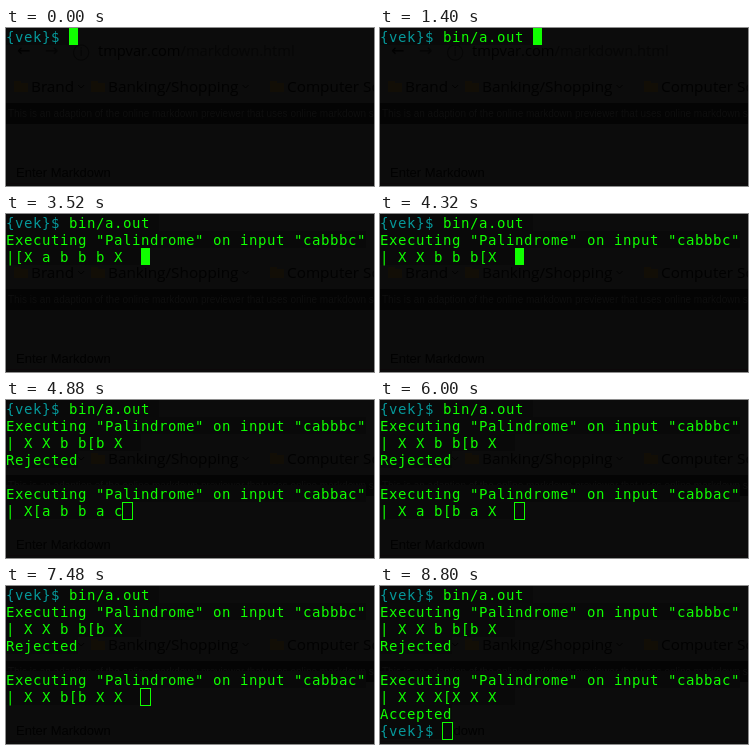
An HTML page with a canvas for the animation above (9440 ms loop, 368 by 158 pixels).

```html
<!DOCTYPE html>
<html lang="en">
<head>
<meta charset="utf-8">
<title>Palindrome machine</title>
<style>
  html, body { margin: 0; height: 100%; overflow: hidden; background: #0a0a0a; }
  canvas { display: block; }
</style>
</head>
<body>
<canvas id="stage" width="368" height="158"></canvas>
<script>
const ctx = document.getElementById('stage').getContext('2d');
const LOOP = 9440, CELL = 9, ROW = 17;
const PROMPT = '{vek}$ ';
const GREEN = '#10ff00', TEAL = '#06989a', SHADE = '#090909', INK = '#020202';

// Turing machine: cross out matching letters from both ends.
function simulate(word) {
  const tape = ['|', ...word], views = [];
  let head = 1;
  const isLetter = () => /[abc]/.test(tape[head]);
  const show = () => views.push(
    tape.map((c, i) => (i === 0 ? '' : i === head ? '[' : ' ') + c).join(''));
  const move = step => {
    head += step;
    tape[head] ??= '';
    show();
  };
  show();
  while (isLetter()) {
    const letter = tape[head];
    tape[head] = 'X';
    do move(1); while (isLetter());
    tape[head] ||= ' ';
    move(-1);
    if (tape[head] !== letter) return { views, verdict: 'Rejected' };
    tape[head] = 'X';
    do move(-1); while (isLetter());
    move(1);
  }
  return { views, verdict: 'Accepted' };
}

// Evenly spaced times, snapped to the 40 ms recording clock.
const spread = (from, to, count) => Array.from({ length: count }, (_, i) =>
  Math.round((from + (to - from) * i / (count - 1)) / 40) * 40);

const runs = [
  { word: 'cabbbc', times: [...spread(1720, 2680, 7), ...spread(2800, 3520, 6), 3720, ...spread(3880, 4480, 5)], end: 4600 },
  { word: 'cabbac', times: [4600, 4880, 4920, ...spread(5080, 6000, 7), 6120, ...spread(6280, 7320, 8), 7480, ...spread(7600, 8520, 7), 8680], end: 8800 },
];
const UNFOCUSED_AT = 4720;

const screens = [];
['', 'b', 'bi', 'bin/', 'bin/a', 'bin/a.out '].forEach((typed, i) =>
  screens.push({ time: i ? 800 + 120 * i : 0, lines: [PROMPT + typed] }));

let history = [PROMPT + 'bin/a.out '];
for (const { word, times, end } of runs) {
  const { views, verdict } = simulate(word);
  history = [...history, `Executing "Palindrome" on input "${word}"`];
  views.forEach((view, i) => screens.push({ time: times[i], lines: [...history, view] }));
  history = [...history, views.at(-1), verdict];
  if (end < 8000) history.push('');
}
screens.push({ time: runs[1].end, lines: [...history, PROMPT] });

function label(text, x, y, font, color) {
  ctx.font = font;
  ctx.fillStyle = color;
  ctx.fillText(text, x, y);
}

function box(x, y, w, h, color) {
  ctx.fillStyle = color;
  ctx.fillRect(x, y, w, h);
}

function chevron(x, y) {
  ctx.beginPath();
  ctx.moveTo(x, y);
  ctx.lineTo(x + 3, y + 3);
  ctx.lineTo(x + 6, y);
  ctx.strokeStyle = INK;
  ctx.stroke();
}

// Web page faintly visible through the terminal.
function drawPage() {
  const icons = '16px "DejaVu Sans", sans-serif';
  const address = '14.7px "Open Sans", sans-serif';
  const bookmark = '15.3px "Open Sans", sans-serif';
  box(0, 0, 368, 158, '#0c0c0c');
  label('←', 11, 28, icons, INK);
  label('→', 39, 28, icons, '#060606');
  label('ⓘ', 67, 28, icons, '#060606');
  label('tmpvar.com', 92, 28, address, INK);
  const hostWidth = ctx.measureText('tmpvar.com').width;
  label('/markdown.html', 92 + hostWidth, 28, address, '#070707');
  for (const [x, name] of [[8, 'Brand'], [85, 'Banking/Shopping'], [264, 'Computer Science']]) {
    box(x, 53, 7, 3, '#120e06');
    box(x, 55, 14, 9, '#120e06');
    label(name, x + 17, 64, bookmark, INK);
    chevron(x + 21 + ctx.measureText(name).width, 57);
  }
  box(0, 75, 368, 21, '#040404');
  label('This is an adaption of the online markdown previewer that uses online markdown styling',
    2, 89, '10px "Liberation Sans", sans-serif', '#0f0f0f');
  label('Enter Markdown', 10, 149, '13px "Liberation Sans", sans-serif', INK);
  box(0, 155, 368, 1, '#0d080a');
}

function drawLine(line, row) {
  const y = row * ROW;
  box(0, y, line.length * CELL, ROW, SHADE);
  ctx.font = '14px "DejaVu Sans Mono", monospace';
  [...line].forEach((char, col) => {
    ctx.fillStyle = line.startsWith(PROMPT) && col < PROMPT.length ? TEAL : GREEN;
    ctx.fillText(char, col * CELL, y + 14);
  });
}

function drawCursor(lines, hollow) {
  const x = lines.at(-1).length * CELL, y = (lines.length - 1) * ROW;
  if (!hollow) return box(x, y, CELL, ROW, GREEN);
  box(x, y, CELL, ROW, SHADE);
  ctx.strokeStyle = GREEN;
  ctx.strokeRect(x - 0.5, y + 0.5, CELL + 1, ROW);
}

function draw(now) {
  const time = now % LOOP;
  const { lines } = screens.findLast(screen => screen.time <= time);
  drawPage();
  lines.forEach(drawLine);
  drawCursor(lines, time >= UNFOCUSED_AT);
  requestAnimationFrame(() => draw(performance.now() - start));
}

const start = performance.now();
draw(0);
</script>
</body>
</html>
```
